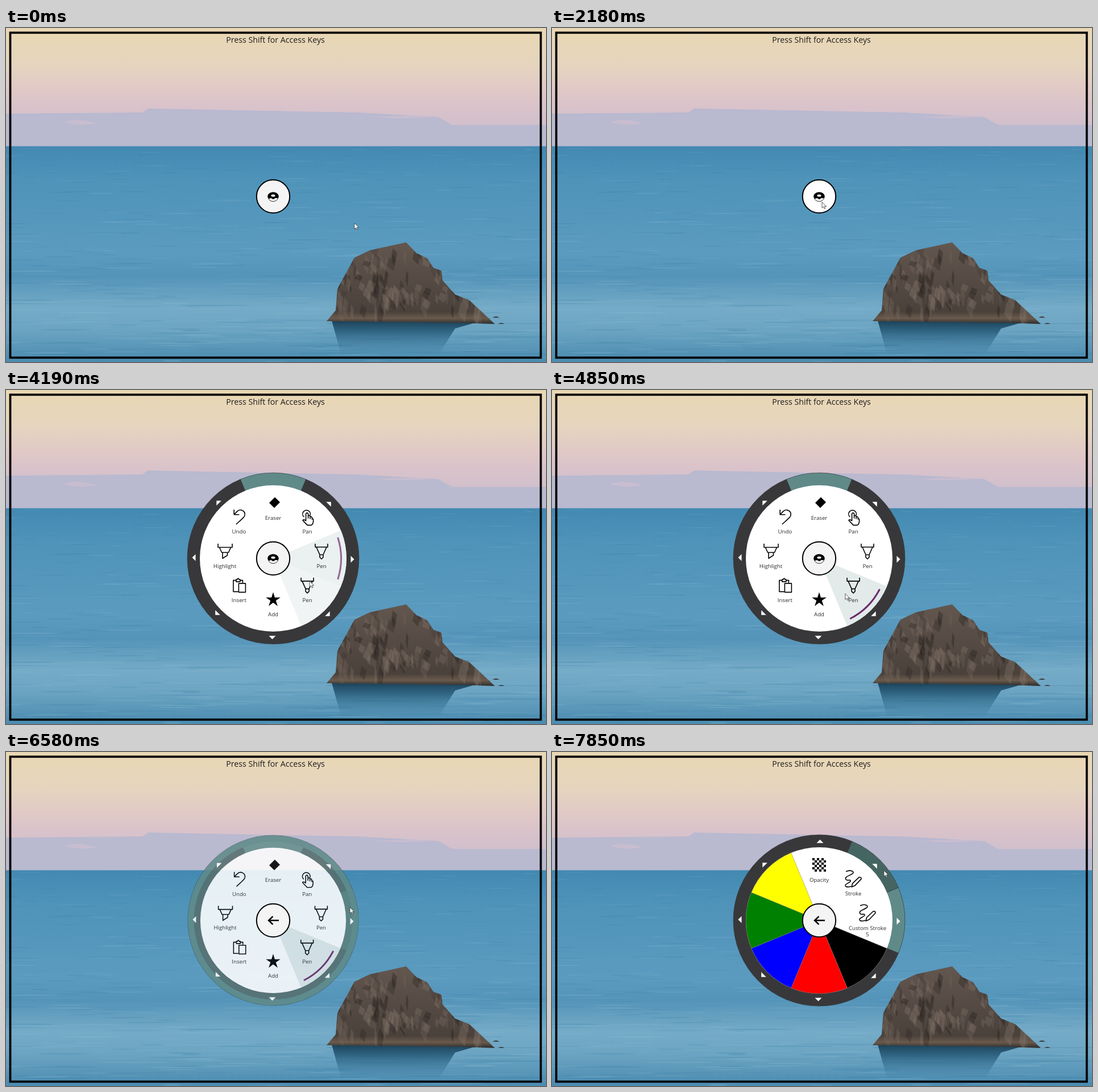
An HTML page for the animation above (8 s loop, 950 by 589 pixels).

```html
<!DOCTYPE html>
<html lang="en">
<head>
<meta charset="utf-8">
<title>Radial menu</title>
<style>
html, body { margin: 0; width: 100%; height: 100%; overflow: hidden; background: #4f94b9; }
svg { position: absolute; left: 0; top: 0; width: 950px; height: 589px; }
text { font-family: "Open Sans", "Noto Sans", sans-serif; font-size: 9.7px; fill: #2c2c2c; text-anchor: middle; }
text.title { font-size: 14.2px; fill: #1d1d1d; }
.line { fill: none; stroke: #000; stroke-width: 1.6; stroke-linejoin: round; }
.arc { fill: none; stroke: #6b2c6b; stroke-width: 3; }
</style>
</head>
<body>
<svg viewBox="0 0 950 589">
  <defs>
    <linearGradient id="sky" x2="0" y2="1">
      <stop offset="0" stop-color="#e9d7b3"/>
      <stop offset=".3" stop-color="#e6d5be"/>
      <stop offset=".48" stop-color="#e2cbc5"/>
      <stop offset=".64" stop-color="#dbc3ca"/>
      <stop offset="1" stop-color="#c5bccd"/>
    </linearGradient>
    <linearGradient id="sea" x2="0" y2="1">
      <stop offset="0" stop-color="#4289b1"/>
      <stop offset=".15" stop-color="#4f93b9"/>
      <stop offset=".5" stop-color="#5b9bbf"/>
      <stop offset=".6" stop-color="#5494b9"/>
      <stop offset=".75" stop-color="#75abc7"/>
      <stop offset=".85" stop-color="#6ba4c2"/>
      <stop offset="1" stop-color="#4a8bb0"/>
    </linearGradient>
    <linearGradient id="rock" x2="0" y2="1">
      <stop offset="0" stop-color="#63574f"/>
      <stop offset=".85" stop-color="#4a413b"/>
      <stop offset=".93" stop-color="#6a5a4c"/>
      <stop offset="1" stop-color="#2b2c2d"/>
    </linearGradient>
    <linearGradient id="shade" x2="0" y2="1">
      <stop offset="0" stop-color="#17384d"/>
      <stop offset=".35" stop-color="#265a78" stop-opacity=".85"/>
      <stop offset="1" stop-color="#3a7ca2" stop-opacity="0"/>
    </linearGradient>
    <clipPath id="rockClip"><use href="#rockShape"/></clipPath>
  </defs>
  <rect width="950" height="210" fill="url(#sky)"/>
  <path fill="#b9b9d0" d="M0 151L240 149L250 142L620 149L760 157L785 171H950V210H0Z"/>
  <path fill="#c8bdd0" d="M102 166Q125 157 160 168Q130 174 102 166M650 157Q700 162 755 156Q715 153 650 157"/>
  <rect y="208.500" width="950" height="381" fill="url(#sea)"/>
  <g id="waves"></g>
  <path fill="url(#shade)" d="M572 512H852L790 530L760 578H590Z"/>
  <path id="rockShape" fill="url(#rock)" d="M564 517L580 498L583 460L613 405L640 392L704 378L722 397L741 406L752 423L766 428L768 445L790 470L815 480L860 522L800 520Z"/>
  <g id="facets" clip-path="url(#rockClip)"></g>
  <path fill="#3d4142" d="M856 511Q862 506 868 511ZM866 522Q871 518 877 522Z"/>
  <rect x="7.5" y="8.300" width="933.300" height="573" fill="none" stroke="#000" stroke-width="3.800"/>
  <text class="title" x="474" y="26">Press Shift for Access Keys</text>
</svg>

<svg viewBox="0 0 950 589"><g transform="translate(470 297)">
  <g id="main"></g>
  <g id="sub"></g>
  <circle id="hub" r="29.200" stroke="#000" stroke-width="2"/>
  <g id="donut">
    <ellipse cy="1" rx="9" ry="7.800" fill="#fff" stroke="#111" stroke-width=".9"/>
    <path d="M-9.700 0C-9.700 -10 9.700 -10 9.700 0Q9 4 6 3Q4 2 2.500 4Q0 6 -2 4Q-4 2 -6 4Q-9 4 -9.700 0Z"/>
    <ellipse cy="-1.500" rx="3.600" ry="2" fill="#fff"/>
  </g>
  <path id="back" d="M10 0H-8M-.5 -7.200L-8 0L-.5 7.200" fill="none" stroke="#000" stroke-width="2.500"/>
  <path id="cursor" fill="#fff" stroke="#333" stroke-width=".8" d="M0 0V10.500L2.500 8.300L4.200 12L5.900 11.200L4.300 7.700H7.600Z"/>
</g></svg>

<script>
const LOOP = 8000, HUB = 30, DISC = 129, RIM = 151;
const GRAY = [56, 56, 58], TEAL = [95, 138, 136], DARK = [69, 101, 98];
const $ = id => document.getElementById(id);
const add = (id, markup) => $(id).insertAdjacentHTML("beforeend", markup);
const mix = (a, b, p) => a + (b - a) * p;
const ramp = (t, from, to) => Math.min(1, Math.max(0, (t - from) / (to - from)));
const ease = p => p * p * (3 - 2 * p);

// Geometry around the hub; angles run clockwise from the top.
const polar = (r, deg) => {
  const a = deg * Math.PI / 180;
  return [r * Math.sin(a), -r * Math.cos(a)];
};
const arc = (r, mid, half) => `M${polar(r, mid - half)}A${r} ${r} 0 0 1 ${polar(r, mid + half)}`;
const sector = (k, r0, r1) =>
  `${arc(r1, k * 45, 22.5)}L${polar(r0, k * 45 + 22.5)}A${r0} ${r0} 0 0 0 ${polar(r0, k * 45 - 22.5)}Z`;

// Scenery texture from one seeded generator.
let seed = 7;
const rand = (lo, hi) => {
  seed = seed * 16807 % 2147483647;
  return mix(lo, hi, seed / 2147483647);
};
for (let i = 0; i < 420; i++) {
  const depth = rand(0, 1), w = rand(8, 25) + 70 * depth * rand(0, 1);
  add("waves", `<ellipse cx="${rand(0, 950)}" cy="${212 + 377 * depth}" rx="${w}" ry="${.5 + depth * rand(.2, 1)}"
    fill="${i % 2 ? "#8dbdd2" : "#3579a0"}" opacity="${rand(.1, .28)}"/>`);
}
for (let i = 0; i < 130; i++) {
  const x = rand(570, 840), y = rand(380, 490), w = rand(3, 12), h = rand(12, 45);
  add("facets", `<path d="M${x} ${y}l${w} ${h * .3}l${-w * .4} ${h * .7}l${-w} ${-h * .4}Z"
    fill="${i % 2 ? "#84756a" : "#26201d"}" opacity="${rand(.15, .45)}"/>`);
}

const starPoints = Array.from({ length: 10 }, (_, i) => polar(i % 2 ? 5 : 13.5, i * 36));
let checks = "";
for (let row = 0; row < 6; row++)
  for (let col = row % 2; col < 6; col += 2) checks += `M${col * 4 - 12} ${row * 4 - 13}h4v4h-4Z`;

const icons = {
  pen: "M-11 -14V-8H11V-14M-9 -8L-3 5.5V10L0 13L3 10V5.5L9 -8M-3 5.5H3",
  marker: "M-12 -14V-7.5H13V-14M-9.5 -7.5L-5.5 1.5H6.5L10.5 -7.5M-4 1.5V12L4.5 6.5V1.5",
  undo: "M-8.700 -14V-5.2H.5M-8.4 -5.5L-3 -11C2 -16 12 -12 10 -3.5C9.4 -1 8 0 -5 12",
  paste: "M-1.5 10.5H-10V-9.5H-5M6.5 -5V-9.5H2M-5 -7V-11H-3Q-1.5 -15 0 -11H2V-7ZM-.5 -4H11.5V11.5H-.5Z",
  hand: "M-6 -1A6.8 6.8 0 1 1 5 -4M-2.5 6V-6.5Q-.5 -10 1.5 -6.5V1V-2.5Q3.5 -5 5 -2V2V-1Q7 -3 8.3 0V3Q10.5 1 10.5 4V7Q10 12 7 13.5H0L-8 5Q-7 2 -2.5 6",
  scribble: "M-13 -14C-5 -18 4 -14 -2 -10C-8 -6 -16 -5 -13 0C-11 3 -4 -1 -5 3C-7 7 -15 7 -14 11C-13 14 -7 13 -4 12M-3 13L-1.5 7L10 -4Q14 -5 14 -1L3 10.5Z",
  diamond: "M3 -11L12 -2L2 8L-7 -1Z",
  star: `M${starPoints.join("L")}Z`,
  checker: checks
};
const solid = ["diamond", "star", "checker"];

const mainItems = [["Eraser", "diamond"], ["Pan", "hand"], ["Pen", "pen"], ["Pen", "pen"],
  ["Add", "star"], ["Insert", "paste"], ["Highlight", "marker"], ["Undo", "undo"]];
const subItems = [["Opacity", "checker"], ["Stroke", "scribble"], ["Custom Stroke", "scribble"],
  "#000", "#f00", "#00f", "#008000", "#ff0"];

function buildMenu(id, items) {
  const each = draw => add(id, items.map(draw).join(""));
  each((_, k) => `<path id="${id}Rim${k}" stroke="#2f2f31" stroke-width=".6" d="${sector(k, DISC - 1, RIM)}"/>`);
  add(id, `<circle r="${DISC}" fill="#fff"/>`);
  each((item, k) => Array.isArray(item)
    ? `<path id="${id}Wedge${k}" fill="#e3eaea" opacity="0" d="${sector(k, 28, DISC)}"/>`
    : `<path fill="${item}" stroke="#777" stroke-width=".5" d="${sector(k, 28, DISC)}"/>`);
  each((item, k) => item[0] === "Eraser" ? "" :
    `<path fill="#fff" transform="rotate(${k * 45})" d="M-4.500 -136.500h12l-6 -6Z"/>`);
  each((item, k) => {
    if (!Array.isArray(item)) return "";
    const [label, icon] = item, [x, y] = polar(85, k * 45);
    const lines = label === "Custom Stroke" ? [label, "5"] : [label];
    return `<path class="${solid.includes(icon) ? "" : "line"}" transform="translate(${x} ${y - 12})" d="${icons[icon]}"/>` +
      lines.map((s, i) => `<text x="${x}" y="${y + 16.5 + i * 11}">${s}</text>`).join("");
  });
}
buildMenu("main", mainItems);
buildMenu("sub", subItems);
add("main", `<g id="glow" fill="none"><circle r="145.500" stroke="#5f8a88" stroke-width="11"/>
  <circle r="134.500" stroke="#6d9592" stroke-width="11" opacity=".6"/></g>`);
// Arrows stay above the glow.
$("main").insertBefore($("glow"), $("main").querySelector("circle"));

// Chosen tools: wedge, time on, time off.
const picks = [[0, -500, 3400], [2, 3450, 4130], [3, 4420, LOOP * 2]];
picks.forEach(([k]) => add("main", `<path id="pick${k}" class="arc" d="${arc(119.5, k * 45, 18)}"/>`));

// Pointer moves: start, end, angle and radius reached.
const moves = [[0, 1, 108.2, 150.5], [1090, 1091, 108.7, 146.7], [1270, 1910, 153, 11], [2690, 2830, 45, 35.4],
  [2850, 3030, 50, 50], [3300, 3710, 85, 82], [3950, 4200, 122, 75.5], [4710, 5470, 360, 94],
  [5530, 6300, 440.3, 137], [7450, 7850, 412.3, 144]];
function pointer(t) {
  let [, , deg, r] = moves[0];
  for (const [from, to, d, q] of moves) {
    const p = ease(ramp(t, from, to));
    deg = mix(deg, d, p);
    r = mix(r, q, p);
  }
  return { deg, r };
}

// Share of the last 160 ms for which the pointer passed a test: a soft hover state.
function hover(t, test) {
  let hits = 0;
  for (let i = 0; i < 16; i++) hits += test(pointer(t - i * 10));
  return hits / 16;
}
const over = (k, lo, hi) => ({ deg, r }) => r > lo && r < hi && Math.round(deg / 45) % 8 === k;

const show = (id, o) => $(id).setAttribute("opacity", o);
const paint = (id, a, b, p) => $(id).setAttribute("fill", `rgb(${a.map((v, i) => Math.round(mix(v, b[i], p)))})`);
function pose(id, o, size) {
  show(id, o);
  $(id).setAttribute("transform", `scale(${size})`);
}

function render(t) {
  const { deg, r } = pointer(t);
  $("cursor").setAttribute("transform", `translate(${polar(r, deg)})`);
  paint("hub", [244, 244, 245], [255, 255, 255], hover(t, p => p.r < HUB));

  const picked = {};
  for (const [k, on, off] of picks) {
    picked[k] = ramp(t, on, on + 180) - ramp(t, off, off + 200);
    show("pick" + k, picked[k]);
  }
  for (let k = 0; k < 8; k++) {
    show("mainWedge" + k, Math.max(picked[k] || 0, hover(t, over(k, HUB, DISC))));
    const rim = hover(t, over(k, DISC, RIM));
    paint("mainRim" + k, k === 0 ? TEAL : GRAY, k === 0 ? TEAL : DARK, rim);
    paint("subRim" + k, k === 2 ? TEAL : GRAY, k === 2 ? TEAL : DARK, rim);
  }

  const open = ramp(t, 2220, 2420), leave = ramp(t, 6520, 6690) ** 2, enter = ramp(t, 6970, 7050);
  pose("main", open * (1 - leave), mix(.93, 1, open) - .05 * leave);
  pose("sub", enter, mix(.98, 1, enter));
  show("glow", ramp(t, 6520, 6570));
  show("donut", +(t < 6360));
  show("back", +(t >= 6360));
}

function tick() {
  render(performance.now() % LOOP);
  requestAnimationFrame(tick);
}
tick();
</script>
</body>
</html>
```
